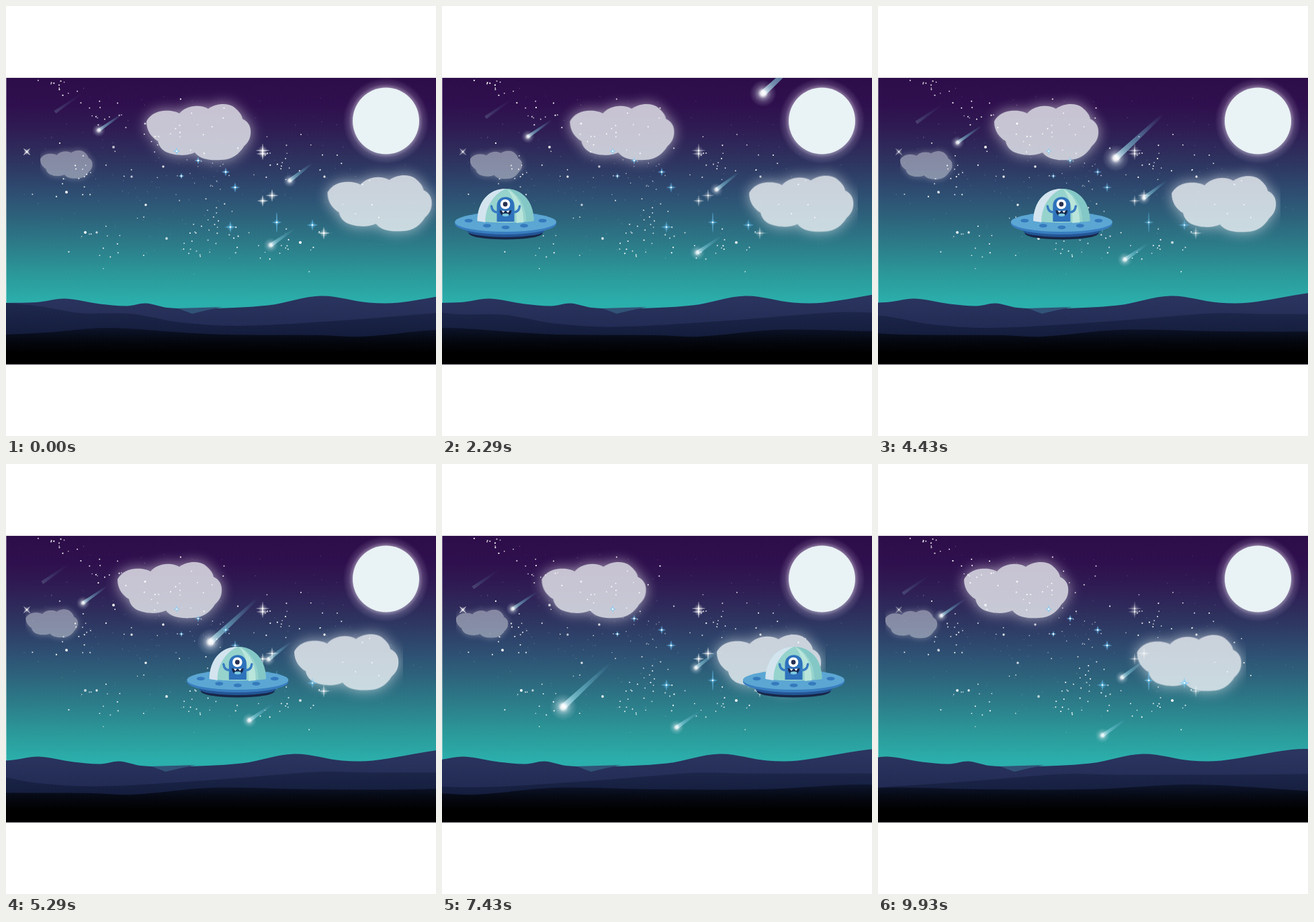
An HTML page with a canvas that plays this animation: 640x640 px, repeating every 10 s.

```html
<!DOCTYPE html>
<html lang="en">
<head>
<meta charset="utf-8">
<title>Night flight</title>
<style>
html, body { margin: 0; width: 100%; height: 100%; overflow: hidden; background: #fff; }
canvas { display: block; width: 100vw; height: 100vh; }
</style>
</head>
<body>
<canvas id="stage" width="640" height="640"></canvas>
<script>
const ctx = document.getElementById('stage').getContext('2d');
const LOOP = 10000, STEPS = 140, TAU = Math.PI * 2;
// A 3:2 scene centred on the square stage.
const HEIGHT = 640 * 2 / 3, TOP = 320 - HEIGHT / 2;

let seed = 11;
const rand = () => (seed = (seed * 16807) % 2147483647) / 2147483647;
const between = (a, b) => a + (b - a) * rand();
const spread = r => (rand() + rand() - 1) * r;

function linear(y0, y1, colors) {
  const g = ctx.createLinearGradient(0, y0, 0, y1);
  colors.forEach((c, i) => g.addColorStop(i / (colors.length - 1), c));
  return g;
}

function disc(x, y, rx, ry, color) {
  ctx.fillStyle = color;
  ctx.beginPath();
  ctx.ellipse(x, y, rx, ry, 0, 0, TAU);
  ctx.fill();
}

function glow(x, y, r, stops) {
  const g = ctx.createRadialGradient(x, y, 0, x, y, r);
  stops.forEach(([at, c]) => g.addColorStop(at, c));
  disc(x, y, r, r, g);
}

// ---------- sky ----------
const sky = linear(TOP, 441, ['#2d0d49', '#2f104e', '#2f1f55', '#2e3460', '#2e4b70', '#2d637c', '#2c7d8a', '#2b9899', '#2bafac']);

const stars = [];
function scatter(count, cx, cy, rx, ry, size, alpha) {
  for (let i = 0; i < count; i++) {
    stars.push({
      x: cx + spread(rx), y: cy + spread(ry), r: size * between(.8, 1.15), alpha,
      period: between(3, 9), phase: between(0, TAU)
    });
  }
}
scatter(12, 70, 125, 40, 22, 1, 1);
scatter(14, 140, 160, 60, 35, 1, 1);
scatter(22, 260, 185, 110, 55, 1, 1);
scatter(22, 120, 250, 90, 50, 1, 1);
scatter(16, 150, 345, 100, 50, 1, 1);
scatter(36, 305, 330, 60, 60, 1, 1);
scatter(18, 290, 260, 80, 40, .8, .8);
scatter(22, 420, 230, 70, 60, 1, 1);
scatter(16, 420, 365, 90, 40, 1, 1);
scatter(8, 520, 290, 60, 80, 1, 1);
scatter(90, 200, 265, 200, 170, .6, .3);
scatter(40, 500, 260, 140, 150, .6, .25);
const brightStars = [[207, 175], [160, 210], [187, 254], [234, 239], [208, 296], [90, 277], [118, 337], [135, 337], [239, 346], [474, 254], [438, 352]];
brightStars.forEach(([x, y]) => scatter(1, x, y, 0, 0, 1.9, 1));

function drawStars(sec) {
  for (const s of stars) {
    ctx.globalAlpha = s.alpha * (.85 + .15 * Math.cos(s.phase + sec * TAU / s.period));
    disc(s.x, s.y, s.r, s.r, '#fff');
  }
  ctx.globalAlpha = 1;
}

function sparkle(x, y, size, tint, alpha, tall = 1, turn = 0) {
  ctx.save();
  ctx.translate(x, y);
  ctx.rotate(turn);
  ctx.globalAlpha = alpha;
  glow(0, 0, size * .7, [[0, `rgba(${tint},.6)`], [1, `rgba(${tint},0)`]]);
  disc(0, 0, size, .75, `rgba(${tint},.75)`);
  disc(0, 0, .75, size * tall, `rgba(${tint},.75)`);
  disc(0, 0, 1.3, 1.3, '#fff');
  ctx.restore();
}

const WHITE = '255,255,255', BLUE = '110,205,255';
const whiteSparkles = [[382, 215, 10], [382, 220, 9], [396, 282, 9], [382, 290, 8], [473, 338, 9]];
const blueSparkles = [[341, 270, 7], [334, 329, 8], [456, 326, 8], [286, 230, 5], [327, 247, 6], [254, 216, 5], [261, 253, 4]];

function drawSparkles(sec) {
  const blink = .75 + .25 * Math.cos(sec * TAU / 6.8);
  const shimmer = .85 + .15 * Math.cos(sec * TAU / 9);
  whiteSparkles.forEach(([x, y, size]) => sparkle(x, y, size, WHITE, blink));
  blueSparkles.forEach(([x, y, size]) => sparkle(x, y, size, BLUE, shimmer));
  sparkle(403, 322, 7, BLUE, shimmer, 2.1);
  sparkle(31, 217, 7, WHITE, blink, 1, TAU / 8);
}

function drawMoon() {
  glow(565.5, 171, 64, [[49 / 64, 'rgba(236,228,245,.5)'], [.86, 'rgba(230,215,242,.18)'], [1, 'rgba(225,205,240,0)']]);
  disc(565.5, 171, 49.5, 49.5, '#e9f2f5');
}

// ---------- meteors ----------
function meteor(x, y, tx, ty, width, head, alpha) {
  ctx.save();
  ctx.globalAlpha = alpha;
  const len = Math.hypot(tx, ty), nx = -ty / len * width / 2, ny = tx / len * width / 2;
  const g = ctx.createLinearGradient(x, y, x + tx, y + ty);
  g.addColorStop(0, 'rgba(190,240,248,.75)');
  g.addColorStop(.4, 'rgba(130,205,225,.5)');
  g.addColorStop(1, 'rgba(110,180,215,0)');
  ctx.fillStyle = g;
  ctx.beginPath();
  ctx.moveTo(x + nx, y + ny);
  ctx.lineTo(x + tx + nx * .4, y + ty + ny * .4);
  ctx.lineTo(x + tx - nx * .4, y + ty - ny * .4);
  ctx.lineTo(x - nx, y - ny);
  ctx.fill();
  if (head) glow(x, y, head, [[0, '#fff'], [.18, 'rgba(255,255,255,.9)'], [.4, 'rgba(235,242,250,.42)'], [.65, 'rgba(225,235,245,.18)'], [1, 'rgba(220,230,245,0)']]);
  ctx.restore();
}

function drawMeteors(p, step) {
  meteor(73 - 36 * p, 158 + 35 * p, 39, -27, 5, 0, .25);
  meteor(138 - 44 * p, 185 + 41 * p, 36, -25, 5, 10, .9);
  meteor(422 - 59 * p, 260 + 58 * p, 34, -26, 6, 10, .9);
  meteor(394 - 60 * p, 356 + 48 * p, 35, -24, 6, 11, .9);
  const fade = Math.min(1, (STEPS - 1 - step) / 20);
  meteor(610 - 574 * p, 27 + 447 * p, 70, -65, 9, 20, fade);
}

// ---------- clouds ----------
const PAD = 24;
const cloudArt = (() => {
  const c = document.createElement('canvas');
  c.width = 156 + PAD * 2;
  c.height = 84 + PAD * 2;
  const g = c.getContext('2d');
  g.translate(PAD, PAD);
  g.fillStyle = '#f2f5f8';
  g.shadowColor = 'rgba(255,255,255,.75)';
  g.shadowBlur = 20;
  g.fill(new Path2D('M0 26C3 19 12 11 25 10C36 9 44 11 49 14C58 3 78-1 92 7C104-2 122-2 131 5C138 11 142 16 143 22C151 26 154 31 155 38C156 48 153 56 145 63C139 73 128 83 112 83C96 84 80 83 72 72C60 78 42 76 34 73C24 70 19 64 17 55C8 50 0 40 0 26Z'));
  return c;
})();

function cloud(x, y, scale, alpha, left = PAD, right = PAD) {
  const w = 156 + left + right, h = cloudArt.height;
  ctx.globalAlpha = alpha;
  ctx.drawImage(cloudArt, PAD - left, 0, w, h, x - left * scale, y - PAD * scale, w * scale, h * scale);
  ctx.globalAlpha = 1;
}

// ---------- hills ----------
const backHill = [[-20, 442], [45, 441], [88, 435.5], [140, 443.5], [180, 446.5], [208, 442.5], [240, 449], [290, 450.5],
  [390, 445.5], [468, 431.5], [540, 441.5], [585, 441.5], [690, 425], [740, 424.5]];
const gap = [[256, 450], [277, 458], [298, 453], [322, 448]];
const midHill = [[-20, 440], [50, 447], [110, 457], [185, 458], [260, 471], [350, 476], [500, 468], [640, 457], [690, 454], [757, 455.5], [990, 455], [1080, 453]];
const frontHill = [[-20, 490], [60, 486], [150, 479], [250, 485], [320, 489], [470, 490], [530, 492], [645, 482], [785, 484], [960, 484], [1110, 477], [1300, 488]];

function hill(points, dx, dy, fill) {
  const at = i => points[Math.max(0, Math.min(points.length - 1, i))];
  const slope = (u, v) => (v[1] - u[1]) / (v[0] - u[0]);
  ctx.fillStyle = fill;
  ctx.save();
  ctx.translate(dx, dy);
  ctx.beginPath();
  ctx.moveTo(at(0)[0], 560);
  ctx.lineTo(...at(0));
  for (let i = 0; i < points.length - 1; i++) {
    const [a, b, c, d] = [at(i - 1), at(i), at(i + 1), at(i + 2)];
    const third = (c[0] - b[0]) / 3;
    ctx.bezierCurveTo(b[0] + third, b[1] + third * slope(a, c), c[0] - third, c[1] - third * slope(b, d), ...c);
  }
  ctx.lineTo(at(points.length)[0], 560);
  ctx.fill();
  ctx.restore();
}

const backFill = linear(430, 480, ['#2b355f', '#222b54']);
const midFill = linear(442, 492, ['#1f294e', '#131c3b']);
const frontFill = linear(478, 516, ['#0d152c', '#050811', '#000']);

function drawHills(p) {
  hill(backHill, -74 * p, 0, backFill);
  ctx.fillStyle = '#315377';
  ctx.beginPath();
  gap.forEach(([x, y]) => ctx.lineTo(x - 74 * p, y));
  ctx.fill();
  hill(midHill, -403 * p, 7 * p, midFill);
  hill(frontHill, -640 * p, 0, frontFill);
}

// ---------- saucer ----------
const dome = new Path2D('M-42 48C-42 20-25 0 0 0C25 0 42 20 42 48Q0 53-42 48Z');
const domeLeft = new Path2D('M-42 48C-42 20-25 0 0 0C-18 8-31 28-30 50Z');
const domeStripe = new Path2D('M2 0C20 10 27 28 27 50L16 51C17 30 12 12 2 0Z');
const domeRight = new Path2D('M4 0C29 3 42 22 42 48L31 49.5C31 28 22 10 4 0Z');
const body = new Path2D('M-13 49V25C-13 8 13 8 13 25V49Z');
const arms = new Path2D('M-12 35Q-20 35-21 26M12 35Q20 35 21 26');
const mouth = new Path2D('M-9 32Q0 34 9 32Q8 41 0 41Q-8 41-9 32Z');
const teeth = new Path2D('M-6 32.6L-3.5 36L-1 33ZM6 32.6L3.5 36L1 33Z');

function drawSaucer(x) {
  const fill = (path, color) => { ctx.fillStyle = color; ctx.fill(path); };
  ctx.save();
  ctx.translate(x, 272);
  disc(0, 66, 55, 9.5, '#182748');
  disc(0, 63, 57, 9, '#235596');
  disc(0, 52, 75.5, 16, '#387dbf');
  disc(0, 49.5, 75.5, 14.5, '#5ba6d3');
  for (let i = -2; i <= 2; i++) disc(27.5 * i, 57.5 - 2.5 * i * i, 6, 2.7, '#357abd');
  fill(dome, '#96d3cd');
  fill(domeLeft, '#d3e4ef');
  fill(domeStripe, '#b9e5da');
  fill(domeRight, '#83c7c6');
  fill(body, '#2e72bc');
  ctx.strokeStyle = '#377cc2';
  ctx.lineWidth = 3.4;
  ctx.lineCap = 'round';
  ctx.stroke(arms);
  disc(-.5, 23, 7.3, 7.3, '#fff');
  disc(-.5, 23, 3.4, 3.4, '#273050');
  fill(mouth, '#17294d');
  fill(teeth, '#fff');
  disc(0, 39, 5, 2.2, '#7cc9e0');
  ctx.restore();
}

// ---------- loop ----------
function draw(ms) {
  const step = Math.min(STEPS - 1, Math.floor(ms * STEPS / LOOP + .07));
  const p = step / (STEPS - 1), sec = step * LOOP / STEPS / 1000;
  ctx.fillStyle = '#fff';
  ctx.fillRect(0, 0, 640, 640);
  ctx.save();
  ctx.beginPath();
  ctx.rect(0, TOP, 640, HEIGHT);
  ctx.clip();
  ctx.fillStyle = sky;
  ctx.fillRect(.4, TOP, 640, 360);
  drawMoon();
  drawMeteors(p, step);
  cloud(209 - 81 * p, 146, 1, .78);
  cloud(478.5 - 93 * p, 252 + 2.5 * p, 1, .8, PAD, 6);
  cloud(51 - 40.5 * p, 215 + 2.5 * p, .5, .45, 0);
  drawStars(sec);
  drawSparkles(sec);
  drawHills(p);
  drawSaucer(-96 + 828 * p);
  ctx.restore();
}

const start = performance.now();
function tick() {
  draw((performance.now() - start) % LOOP);
  requestAnimationFrame(tick);
}
tick();
</script>
</body>
</html>
```
